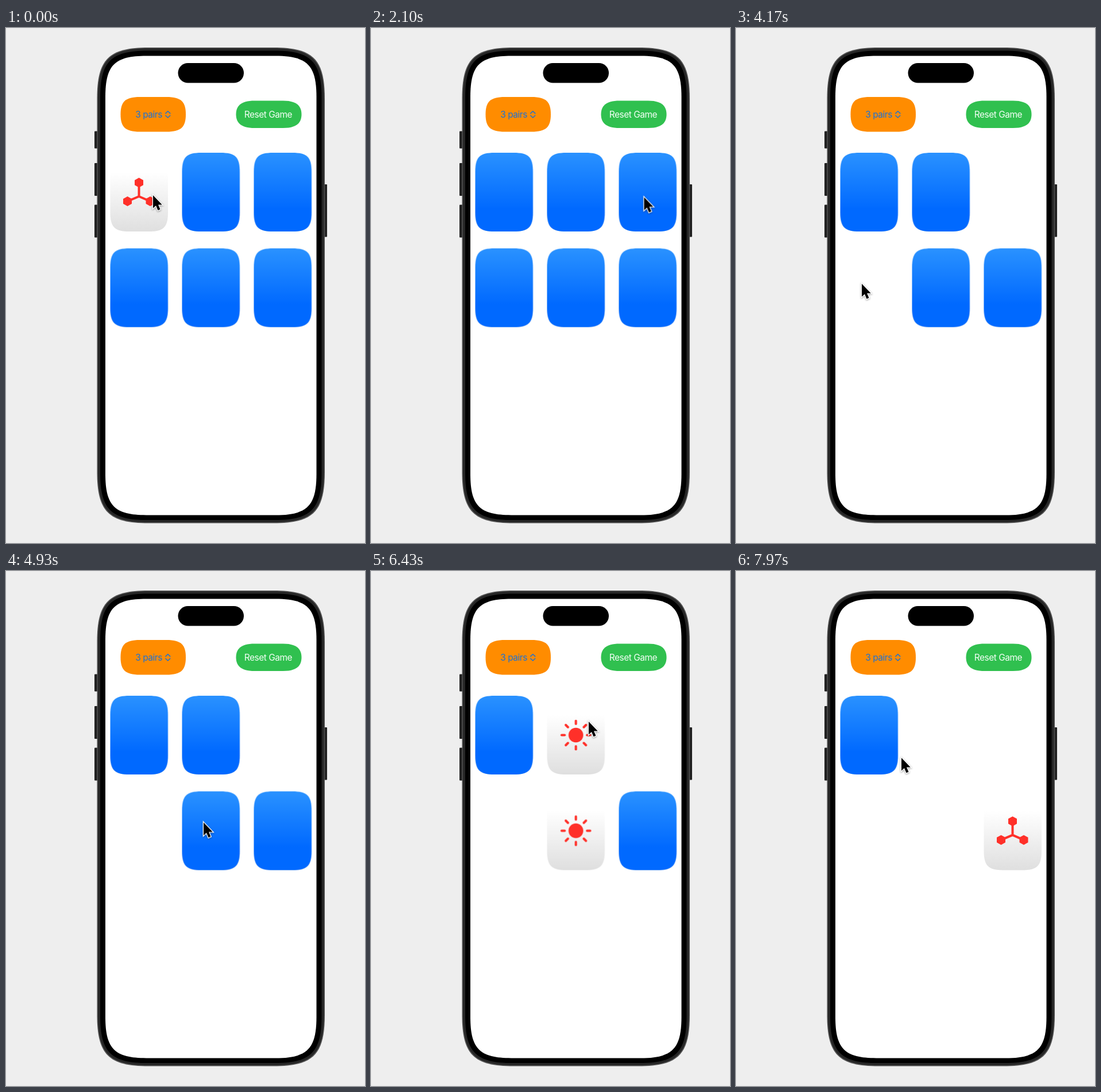
Write an HTML page that moves like this. It is 625 by 896 pixels and loops after 8 s.

```html
<!DOCTYPE html>
<html lang="en">
<head>
<meta charset="utf-8">
<title>Pairs game</title>
<style>
  html, body { margin: 0; width: 100%; height: 100%; overflow: hidden; background: #eee; }
  svg { display: block; width: 625px; height: 896px; }
  text { font: 15.5px Inter, "Liberation Sans", sans-serif; letter-spacing: -.5px; }

  .back, .pair, #cursor { animation: 8s linear infinite; }
  #cursor { animation-name: pointer; animation-timing-function: ease-in-out; }
  .pair.stars { animation-name: stars-leave; }
  .pair.suns { animation-name: suns-leave; }
  #c0 .back { animation-name: flip0; }
  #c1 .back { animation-name: flip1; }
  #c2 .back { animation-name: flip2; }
  #c3 .back { animation-name: flip3; }
  #c4 .back { animation-name: flip4; }
  #c5 .back { animation-name: flip5; }

  @keyframes flip0 { 0%, 21% { opacity: 0 } 24.5%, 100% { opacity: 1 } }
  @keyframes flip1 { 0%, 76.25% { opacity: 1 } 79.25%, 100% { opacity: 0 } }
  @keyframes flip2 { 0%, 28% { opacity: 1 } 31.25%, 100% { opacity: 0 } }
  @keyframes flip3 { 0%, 37.5% { opacity: 1 } 40.5%, 100% { opacity: 0 } }
  @keyframes flip4 {
    0%, 12.5% { opacity: 1 } 15.5%, 21% { opacity: 0 }
    24.5%, 62.5% { opacity: 1 } 65.5%, 100% { opacity: 0 }
  }
  @keyframes flip5 { 0%, 91.25% { opacity: 1 } 94.25%, 100% { opacity: 0 } }
  @keyframes stars-leave { 0%, 46.25% { opacity: 1 } 50%, 100% { opacity: 0 } }
  @keyframes suns-leave { 0%, 85.5% { opacity: 1 } 89%, 100% { opacity: 0 } }
  @keyframes pointer {
    0%, .8% { transform: translate(256px, 291px) }
    10.3%, 14.5% { transform: translate(359px, 421.5px) }
    23%, 32% { transform: translate(475.5px, 294.5px) }
    36.5%, 52.5% { transform: translate(219px, 445px) }
    61%, 64.5% { transform: translate(344px, 437.5px) }
    75%, 83% { transform: translate(379px, 262px) }
    90.5%, 94.6% { transform: translate(487px, 444px) }
    99.6%, 100% { transform: translate(288px, 325px) }
  }
</style>
</head>
<body>
<svg viewBox="0 0 625 896">
  <defs>
    <linearGradient id="blue" x2="0" y2="1">
      <stop stop-color="#2a92ff"/><stop offset=".72" stop-color="#0069ff"/>
    </linearGradient>
    <linearGradient id="grey" x2="0" y2="1">
      <stop offset=".25" stop-color="#fff"/><stop offset="1" stop-color="#dfdfdf"/>
    </linearGradient>
    <path id="hex" d="M0-8.5 7.5-4.3V4.3L0 8.5-7.5 4.3V-4.3Z"/>
    <g id="molecule" fill="#ff3029">
      <path d="M50 52V76L30 84.5M50 76 69.5 84.5" fill="none" stroke="#ff3029" stroke-width="4"/>
      <use href="#hex" x="50" y="52"/><use href="#hex" x="30" y="84.5"/><use href="#hex" x="69.5" y="84.5"/>
    </g>
    <path id="ray" d="M0-19.5V-24.8" stroke="#ff3029" stroke-width="4" stroke-linecap="round"/>
    <g id="sun" transform="translate(50.2 68.5)"><circle r="12.8" fill="#ff3029"/></g>
    <path id="star" fill="#ff3029"/>
  </defs>

  <g fill="#222">
    <rect x="154" y="179.500" width="7" height="30" rx="1"/>
    <rect x="154" y="235" width="7" height="57" rx="1"/>
    <rect x="154" y="307.500" width="7" height="57" rx="1"/>
    <rect x="552" y="272" width="7" height="91.500" rx="1"/>
  </g>
  <path data-box="158.5 34 396.5 827.5 64" fill="#505050"/>
  <path data-box="160 35.5 393.5 824.5 63" fill="#262626"/>
  <path data-box="164 39.500 385.5 816.5 59" fill="#000"/>
  <path data-box="173 48.500 367.5 799 51" fill="#fff"/>
  <rect x="299.500" y="61" width="114.500" height="34.500" rx="17.200"/>

  <path data-box="199.500 120 113.5 60.5 24" fill="#ff8c00"/>
  <text x="225.300" y="156" fill="#1a72d8">3 pairs</text>
  <path d="M277.800 148.600 281.800 144.800 285.800 148.600M277.800 152.200 281.800 156 285.800 152.200"
        fill="none" stroke="#1a72d8" stroke-width="1.500" stroke-linecap="round" stroke-linejoin="round"/>
  <path data-box="400.500 126.500 114 47.500 23" fill="#30c04f"/>
  <text x="414.800" y="156" fill="#f4fff6">Reset Game</text>

  <g id="cards"></g>

  <g id="cursor">
    <path d="M0 0V22.500L5 18 8.500 26.300 12.500 24.600 9 16.400H15.800Z" fill="#000" stroke="#fff"
          stroke-width="2.600" paint-order="stroke" style="filter: drop-shadow(0 1.5px 1.5px #0006)"/>
  </g>
</svg>
<script>
  const find = selector => document.querySelector(selector);

  // Rounded box whose corners ease gradually into the sides.
  function smoothBox(x, y, w, h, r) {
    const ex = Math.min(1.4 * r, w / 2), ey = Math.min(1.4 * r, h / 2);
    const pull = e => (2.344 * r - e) / 3;
    const cx = pull(ex), cy = pull(ey), R = x + w, B = y + h;
    return `M${x + ex} ${y}H${R - ex}C${R - cx} ${y} ${R} ${y + cy} ${R} ${y + ey}` +
      `V${B - ey}C${R} ${B - cy} ${R - cx} ${B} ${R - ex} ${B}` +
      `H${x + ex}C${x + cx} ${B} ${x} ${B - cy} ${x} ${B - ey}` +
      `V${y + ey}C${x} ${y + cy} ${x + cx} ${y} ${x + ex} ${y}Z`;
  }

  for (let i = 0; i < 8; i++)
    find('#sun').innerHTML += `<use href="#ray" transform="rotate(${i * 45})"/>`;

  const starPoints = Array.from({ length: 10 }, (_, i) => {
    const r = i % 2 ? 11 : 27, a = i * Math.PI / 5;
    return `${50 + r * Math.sin(a)} ${70 - r * Math.cos(a)}`;
  });
  find('#star').setAttribute('d', `M${starPoints.join('L')}Z`);

  const symbols = ['molecule', 'sun', 'star', 'star', 'sun', 'molecule'];
  const leaving = { sun: 'pair suns', star: 'pair stars' };
  find('#cards').innerHTML = symbols.map((symbol, i) => {
    const x = 181.5 + i % 3 * 125, y = 217 + Math.floor(i / 3) * 166.4;
    return `<g id="c${i}" class="${leaving[symbol] || ''}"><g transform="translate(${x} ${y})">
      <path data-box="0 0 100.5 137 24" fill="url(#grey)"/>
      <use href="#${symbol}"/>
      <path class="back" data-box="0 0 100.5 137 24" fill="url(#blue)"/>
    </g></g>`;
  }).join('');

  document.querySelectorAll('[data-box]').forEach(path =>
    path.setAttribute('d', smoothBox(...path.dataset.box.split(' ').map(Number))));
</script>
</body>
</html>
```
